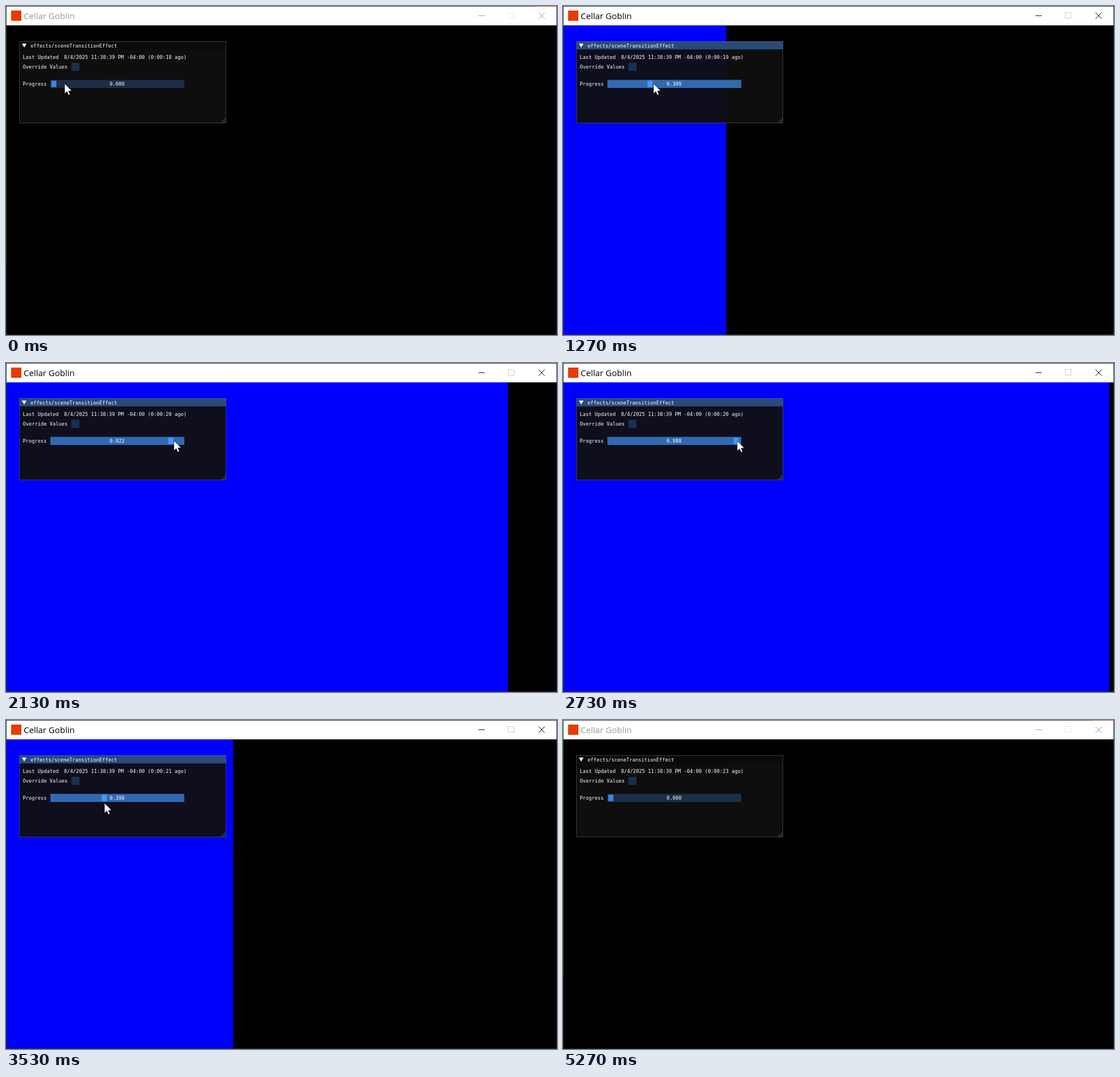
An HTML page with a canvas for the animation above (5.8 s loop, 968 by 578 pixels).

```html
<!DOCTYPE html>
<html lang="en">
<head>
<meta charset="utf-8">
<title>Scene transition slider</title>
<style>
html, body { margin: 0; width: 100%; height: 100%; overflow: hidden; background: #000; }
canvas { display: block; }
</style>
</head>
<body>
<canvas id="stage" width="968" height="578"></canvas>
<script>
const W = 968, H = 578, BAR = 34;
const LOOP = 5800, STEP = 200 / 3, LAG = 20;
const PRESS = 530, RELEASE = 4530, BLUR = 5200;
const MONO = '8.72px "DejaVu Sans Mono", monospace';
const ctx = document.getElementById('stage').getContext('2d');

// Drag of the slider: time, progress
const DRAG = [
  [PRESS, 0], [800, .074], [1670, .564], [2130, .922], [2330, .996],
  [2670, .996], [3070, .77], [3270, .59], [4000, .098], [4200, 0]
];

const ramp = (t, from, to) => Math.min(1, Math.max(0, (t - from) / (to - from)));
const ease = (t, from, to) => {
  const u = ramp(t, from, to);
  return u * u * (3 - 2 * u);
};

const secant = i => (DRAG[i + 1][1] - DRAG[i][1]) / (DRAG[i + 1][0] - DRAG[i][0]);

function slope(i) {
  if (i === 0 || i === DRAG.length - 1) return 0;
  const a = secant(i - 1), b = secant(i);
  return a * b > 0 ? 2 * a * b / (a + b) : 0;
}

// Monotone cubic curve through the drag points
function progressAt(t) {
  const i = DRAG.findIndex(([time]) => time > t) - 1;
  if (i < 0) return 0;
  const [t0, p0] = DRAG[i], [t1, p1] = DRAG[i + 1];
  const span = t1 - t0, u = (t - t0) / span, v = 1 - u;
  return p0 * (1 + 2 * u) * v * v + p1 * u * u * (3 - 2 * u)
    + span * u * v * (slope(i) * v - slope(i + 1) * u);
}

function rect(x, y, w, h, fill) {
  ctx.fillStyle = fill;
  ctx.fillRect(x, y, w, h);
}

function outline(x, y, w, h, stroke) {
  ctx.strokeStyle = stroke;
  ctx.strokeRect(x, y, w, h);
}

function poly(points, fill) {
  ctx.beginPath();
  points.forEach(([x, y]) => ctx.lineTo(x, y));
  ctx.closePath();
  ctx.fillStyle = fill;
  ctx.fill();
}

function text(str, x, y, font = MONO, fill = '#fff') {
  ctx.font = font;
  ctx.fillStyle = fill;
  ctx.fillText(str, x, y);
}

function drawFrame(active) {
  const ink = active ? '#000' : '#999';
  rect(0, 0, W, BAR, '#fff');
  rect(9, 8, 18, 18, '#e73c00');
  text('Cellar Goblin', 31, 23, '15px "Open Sans", "Noto Sans", sans-serif', ink);
  rect(830, 16.5, 11, 1, ink);
  outline(882.5, 11.5, 10, 10, active ? '#ccc' : '#ebebeb');
  ctx.strokeStyle = ink;
  ctx.beginPath();
  ctx.moveTo(935.5, 11.5); ctx.lineTo(946.5, 22.5);
  ctx.moveTo(946.5, 11.5); ctx.lineTo(935.5, 22.5);
  ctx.stroke();

  outline(.5, .5, W - 1, H - 1, '#333');
  if (!active) {
    rect(0, 0, W, 1, '#4a4d2c');
    rect(930, 0, 38, 1, '#a85a30');
    rect(0, 0, 1, 450, '#2f5a12');
    rect(0, H - 1, W, 1, '#2c1a26');
  }
}

function drawPanel(progress, seconds, active, dragging) {
  const field = 'rgba(41,74,122,.54)';
  rect(23.5, 62, 363, 144, 'rgba(15,15,15,.94)');
  rect(23.5, 62, 363, 14.25, active ? '#294a7a' : '#0a0a0a');
  poly([[28, 66], [36, 66], [32, 73]], '#fff');
  text('effects/sceneTransitionEffect', 43, 73);
  text('Last Updated', 29.5, 93);
  text(`8/4/2025 11:38:39 PM -04:00 (0:00:${seconds} ago)`, 102, 93);
  text('Override Values', 29.5, 110);
  rect(114.75, 99.75, 14.25, 14.25, field);
  text('Progress', 29.5, 140);
  rect(78, 129.75, 235.25, 14.25, dragging ? 'rgba(66,150,250,.67)' : field);
  rect(79.5 + 223 * progress, 131.25, 9, 11.25, dragging ? '#4296fa' : '#3d85e0');
  text(progress.toFixed(3), 182, 140);
  poly([[386, 195], [386, 205], [376, 205]], 'rgba(66,150,250,.2)');
  outline(23.75, 62.5, 362.5, 143, 'rgba(110,110,128,.5)');
}

function drawPointer(t) {
  const away = ease(t, 4000, 4670);
  const x = 87 + 16 * (1 - ramp(t, 0, 200)) + 223 * progressAt(t + LAG) - 49 * ease(t, 4130, 4670);
  const y = 136.5 + 15 * ramp(t, 2670, 4000) + 70 * away;
  ctx.save();
  ctx.translate(Math.round(x), Math.round(y * 2) / 2);
  poly([[0, 0], [0, 17.5], [4, 13.8], [6.8, 20], [9.6, 18.8], [6.9, 12.8], [12.6, 12.6]], '#fff');
  ctx.lineWidth = .6;
  ctx.strokeStyle = '#000';
  ctx.stroke();
  ctx.restore();
}

function draw(now) {
  const step = Math.floor((now % LOOP + 3.4) / STEP);
  const t = Math.round(step * STEP / 10) * 10;
  const active = t >= PRESS && t < BLUR;
  const dragging = t >= PRESS && t < RELEASE;
  const edge = Math.round(W * progressAt(t - LAG));

  ctx.lineWidth = 1;
  rect(0, 0, W, H, '#000');
  rect(0, BAR, edge, H - BAR, '#00f');
  drawFrame(active);
  drawPanel(progressAt(t), 18 + Math.min(5, Math.floor(t / 1000)), active, dragging);
  if (t < BLUR) drawPointer(t);
  requestAnimationFrame(draw);
}
requestAnimationFrame(draw);
</script>
</body>
</html>
```
